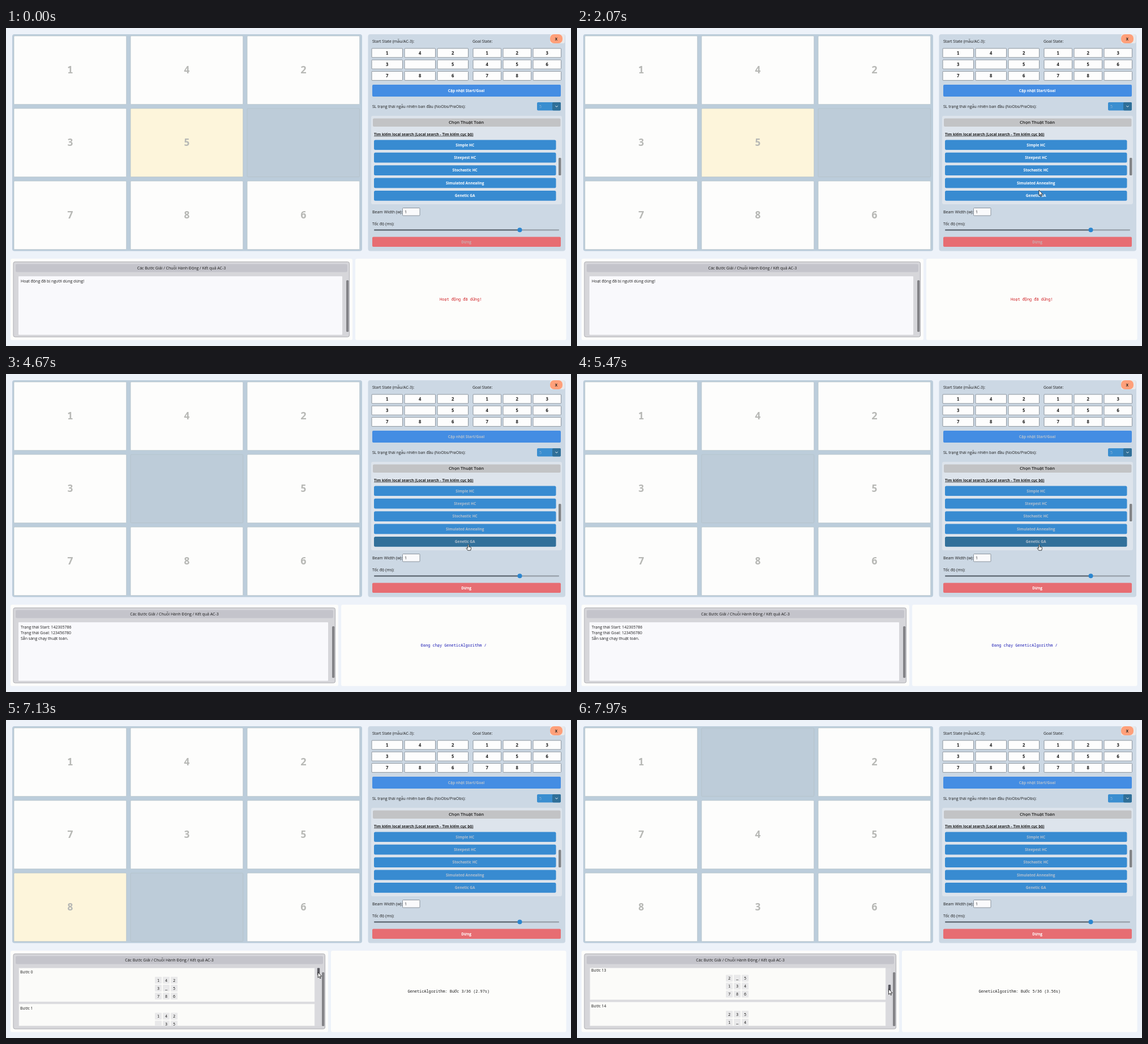
Animation of 998x561 px, one loop 8000 ms. Source, as an HTML page:

```html
<!DOCTYPE html>
<html lang="vi">
<head>
<meta charset="utf-8">
<title>8-puzzle</title>
<style>
html, body { margin: 0; width: 100%; height: 100%; overflow: hidden; background: #edf2f9; }
svg { display: block; width: 998px; height: 561px; }
text { font: 7px "Open Sans", "Noto Sans", sans-serif; fill: #1c1c1c; white-space: pre; }
.b { font-weight: 700; font-size: 6.5px; }
.head { font-weight: 600; font-size: 7.6px; }
.group { font-weight: 700; font-size: 6.55px; text-decoration: underline; }
.mono { font: 6.9px "Noto Sans Mono", "DejaVu Sans Mono", monospace; }
.num { font: 700 8px "Noto Sans Mono", "DejaVu Sans Mono", monospace; }
.tile { font: 700 18px "Noto Sans Mono", "DejaVu Sans Mono", monospace; fill: #b7b8b5; }
.mid { text-anchor: middle; }
</style>
</head>
<body>
<svg viewBox="0 0 998 561">
  <defs>
    <clipPath id="list"><rect x="22" y="437.5" width="540" height="102"/></clipPath>
    <clipPath id="narrow"><rect x="272" y="437" width="34.5" height="103"/></clipPath>
    <clipPath id="cut"><rect x="713" y="470" width="142" height="20"/></clipPath>
  </defs>
  <g id="fixed"></g>
  <g id="live"></g>
  <g id="cursor">
    <path id="arrow" d="M0 0V9.6L2.2 7.6L3.7 11L5.2 10.3L3.7 7.1H6.6Z" fill="#fff" stroke="#111" stroke-width=".8"/>
    <path id="hand" d="M-.9 .8Q0-.6 .9 .8V4.2L4.6 5.2Q5.2 5.4 5 6.6L4.2 10.6H-.9L-3.4 7Q-3.2 5.6-1.9 6.4L-.9 7.2Z" fill="#fff" stroke="#111" stroke-width=".8"/>
  </g>
</svg>
<script>
const LOOP = 8000, UPDATE = 2750, RUN = 4170, SPIN_END = 5730, DONE = 6440, FIRST = 6490, STEP = 310;
const $ = id => document.getElementById(id);

const box = (x, y, x2, y2, fill, r = 0, more = '') =>
  `<rect x="${x}" y="${y}" width="${x2 - x}" height="${y2 - y}" rx="${r}" fill="${fill}" ${more}/>`;
const text = (x, y, s, cls = '', fill = '') =>
  `<text x="${x}" y="${y}" class="${cls}"${fill && ` style="fill:${fill}"`}>${s}</text>`;
const mid = (x, y, s, cls = '', fill = '') => text(x, y, s, 'mid ' + cls, fill);

// Boards reached by sliding the blank
const boards = ['142305786'];
for (const move of 'LDRUURDLDLUURDLU') {
  const cells = [...boards[boards.length - 1]];
  const from = cells.indexOf('0'), to = from + { L: -1, R: 1, U: -3, D: 3 }[move];
  [cells[from], cells[to]] = [cells[to], cells[from]];
  boards.push(cells.join(''));
}

const algorithms = ['Simple HC', 'Steepest HC', 'Stochastic HC', 'Simulated Annealing', 'Genetic GA'];
const algY = i => 197.4 + i * 22.4;

function inputs(x0, pitch, width, values) {
  return [...values].map((v, i) => {
    const x = x0 + i % 3 * pitch, y = 36 + Math.floor(i / 3) * 20.2;
    return box(x, y, x + width, y + 16, '#fdfdfd', 1, 'stroke="#8b949d"') +
      (v > 0 ? mid(x + width / 2, y + 10.6, v, 'num') : '');
  }).join('');
}

$('fixed').innerHTML =
  box(11, 11, 629, 393.5, '#bccddb', 4) +
  box(639.5, 11, 988, 393.5, '#ccd8e4', 4) +
  box(961, 11, 987, 27, '#e9e9ea', 3) + box(961, 11, 983, 27, '#ffa07a', 7) +
  mid(972, 21.6, 'X', 'b') +
  text(647, 25.5, 'Start State (mẫu/AC-3):') + text(824, 25.5, 'Goal State:') +
  inputs(646, 58, 54.5, boards[0]) + inputs(825, 53, 49.5, '123456780') +
  box(647, 100, 980, 121, '#448de3', 2) +
  text(647, 140.8, 'SL trạng thái ngẫu nhiên ban đầu (NoObs/PraObs):') +
  box(938, 131, 980, 145.5, '#3a8ed0', 2) + box(965, 131, 980, 145.5, '#2f6f98', 2) +
  text(942, 141, '5', '', '#8fb4d6') +
  '<path d="M970.5 137.3l2 2l2-2" fill="none" stroke="#fff"/>' +
  box(645, 155, 982, 311, '#dde4ec', 3) +
  box(648, 159.5, 979.5, 174, '#c2c3c5', 2) +
  mid(813, 169.4, 'Chọn Thuật Toán', 'head') +
  text(650, 189.6, 'Tìm kiếm local search (Local search - Tìm kiếm cục bộ)', 'group') +
  box(976, 229, 980.5, 260, '#828486', 1.5) +
  text(647, 326.8, 'Beam Width (w):') +
  box(700.5, 317.5, 731, 331, '#fafafc', 1, 'stroke="#8b949d"') + text(704, 326.8, '1') +
  text(647, 347.8, 'Tốc độ (ms):') +
  box(650, 355.2, 908, 357.4, '#5c6670', 1) + box(908, 355.2, 977, 357.4, '#97a0a9', 1) +
  '<circle cx="907.5" cy="356.3" r="4" fill="#2b86cf"/>' +
  box(647, 368.5, 980, 386, '#e76d72', 2);

const stepAt = t => t < FIRST ? 0 : Math.min(5, Math.floor((t - FIRST) / STEP) + 1);

function board(t) {
  const n = stepAt(t), cells = t < UPDATE ? '142350786' : boards[n];
  const fresh = n && t - FIRST - (n - 1) * STEP < 150;
  const lit = t < UPDATE ? 4 : fresh ? boards[n - 1].indexOf('0') : -1;
  return [...cells].map((v, i) => {
    const x = 14 + i % 3 * 206, y = 14 + Math.floor(i / 3) * 128;
    const fill = v === '0' ? '#bdccd9' : i === lit ? '#fdf5db' : '#fdfdfc';
    return box(x, y, x + 198.7, y + 120.7, fill, 1.5, 'stroke="#b3c1c6" stroke-width=".7"') +
      (v === '0' ? '' : mid(x + 99.4, y + 66.4, v, 'tile'));
  }).join('');
}

function controls(t) {
  const running = t >= RUN, soft = running ? '#b4c1cf' : '#fff';
  let out = mid(813, 112.8, 'Cập nhật Start/Goal', 'b', soft);
  algorithms.forEach((name, i) => {
    const pressed = i === 4 && t >= RUN - 80 && t < FIRST;
    out += box(650, algY(i), 971.5, algY(i) + 17.7, pressed ? '#32709a' : '#388bd1', 2.5) +
      mid(810.7, algY(i) + 11.2, name, 'b', soft);
  });
  out += mid(813, 379.6, 'Dừng', 'b', running ? '#fff' : '#c9adb0');
  if (t >= UPDATE && t < RUN && (t - UPDATE) % 1200 < 600) out += box(851.8, 39.5, 852.6, 48, '#111');
  return out;
}

function status(t) {
  if (t < UPDATE) return ['Hoạt động đã dừng!', '#cf1a1e', 607];
  if (t < RUN) return ['Start/Goal đã cập nhật. Sẵn sàng chạy.', '#1c1c1c', 557];
  if (t < DONE) {
    const i = Math.floor((Math.min(t, SPIN_END) - RUN) / 100) % 4;
    return ['Đang chạy GeneticAlgorithm ' + '|/-\\'[i], '#1b1bb4', 582];
  }
  const n = Math.max(1, stepAt(t)), secs = ['2.34', '2.65', '2.97', '3.27', '3.56'][n - 1];
  return [`GeneticAlgorithm: Bước ${n}/36 (${secs}s)`, '#1c1c1c', t < FIRST ? 567 : 564];
}

const dragAt = t => 29.5 * ease((t - 7270) / 640);

function stepList(t, right, tearing) {
  const drag = dragAt(t), scroll = drag * 829 / 29.5, end = right - (tearing ? 17 : 19);
  const gridX = tearing ? 272 : 263;
  let cards = '', grids = '';
  boards.forEach((cells, i) => {
    const y = 437.5 + i * 63.5 - scroll;
    if (y < 370 || y > 540) return;
    cards += box(23, y, end, y + 59.5, '#fbfbf9', 0, 'stroke="#ececec" stroke-width=".6"') +
      text(25, y + 9.6, 'Bước ' + i);
    [...cells].forEach((v, k) => {
      const x = gridX + k % 3 * 14, cy = y + 15.5 + Math.floor(k / 3) * 14;
      const blank = tearing && i === 1 && v === '0' || !tearing && i === 1 && v === '0';
      grids += box(x, cy, x + 12, cy + 12, '#e9e9ea', 1) +
        mid(x + 6, cy + 8.6, v === '0' ? (blank ? '' : '_') : v, 'mono');
    });
  });
  const tx = tearing ? 552.3 : 549.8;
  return box(22, 437.5, right - 9, 540, '#dadade') +
    `<g clip-path="url(#list)">${cards}<g${tearing ? ' clip-path="url(#narrow)"' : ''}>${grids}</g></g>` +
    box(tx, 437.5 + drag, tx + 4.4, 450 + drag, t > 6900 ? '#5b5b62' : '#85858a', 1);
}

function output(t) {
  const [label, color, right] = status(t);
  const done = t >= DONE, tearing = done && t < FIRST;
  const panelEnd = tearing ? 963 : 989.5;
  let out = box(8, 407, right + 5, 550.5, '#fdfdfb', 3) +
    box(right + 10, 407, panelEnd, 550.5, '#fdfdfb', 3) +
    box(13, 412.5, right - .5, 545, '#d6d6da', 3, 'stroke="#a9a9ad" stroke-width=".9"') +
    box(17, 416.5, right - 4, 430.5, '#c4c4cb', 2) +
    mid((13 + right) / 2, 426, 'Các Bước Giải / Chuỗi Hành Động / Kết quả AC-3');
  if (tearing) {
    out += box(567, 407, 573, 550.5, '#fdfdfb') + box(572.5, 412.5, 577, 545, '#d3d3d8') +
      box(572.5, 416.5, 577, 430, '#bdbdc5') + box(575.5, 445, 577, 540, '#828286');
  }
  if (done) out += stepList(t, right, tearing);
  else {
    const lines = t < UPDATE ? ['Hoạt động đã bị người dùng dừng!']
      : ['Trạng thái Start: 142305786', 'Trạng thái Goal: 123456780', 'Sẵn sàng chạy thuật toán.'];
    out += box(22, 438, right - 13, 541.3, '#f9f9fc', 1) +
      lines.map((s, i) => text(26, 449 + i * 10, s)).join('');
  }
  out += box(right - 6, 445, right - 1.7, done ? 540 : 536, '#828286', 1.5);
  const cx = tearing ? 783.5 : (right + 10 + 989.5) / 2;
  return out + `<g${tearing ? ' clip-path="url(#cut)"' : ''}>${mid(cx, 481, label, 'mono', color)}</g>`;
}

function ease(p) {
  p = Math.max(0, Math.min(1, p));
  return p * p * (3 - 2 * p);
}

// time, x, y of the pointer tip
const path = [
  [1450, 838, 575], [1950, 816, 286], [2150, 816, 286], [2600, 814, 111], [2850, 814, 111],
  [3280, 814, 205.5], [3500, 814, 205.5], [4000, 816.5, 300.5], [6030, 816.5, 300.5],
  [6430, 561, 445], [6600, 561, 445], [6900, 551, 445], [7270, 551, 445]
];

function pointer(t) {
  const i = path.findIndex(p => p[0] > t);
  if (i === 0) return path[0].slice(1);
  if (i < 0) return [550.5, 445 + dragAt(t)];
  const [t0, x0, y0] = path[i - 1], [t1, x1, y1] = path[i], p = ease((t - t0) / (t1 - t0));
  return [x0 + (x1 - x0) * p, y0 + (y1 - y0) * p];
}

function overButton(x, y) {
  if (x < 650 || x > 971) return false;
  return y > 100 && y < 121 || algorithms.some((_, i) => y > algY(i) && y < algY(i) + 17.7);
}

let last = '';
function draw() {
  const t = performance.now() % LOOP;
  const scene = board(t) + controls(t) + output(t);
  if (scene !== last) $('live').innerHTML = last = scene;
  const [x, y] = pointer(t), hand = overButton(x, y);
  $('cursor').setAttribute('transform', `translate(${x} ${y})`);
  $('hand').style.display = hand ? '' : 'none';
  $('arrow').style.display = hand ? 'none' : '';
  requestAnimationFrame(draw);
}
draw();
</script>
</body>
</html>
```
